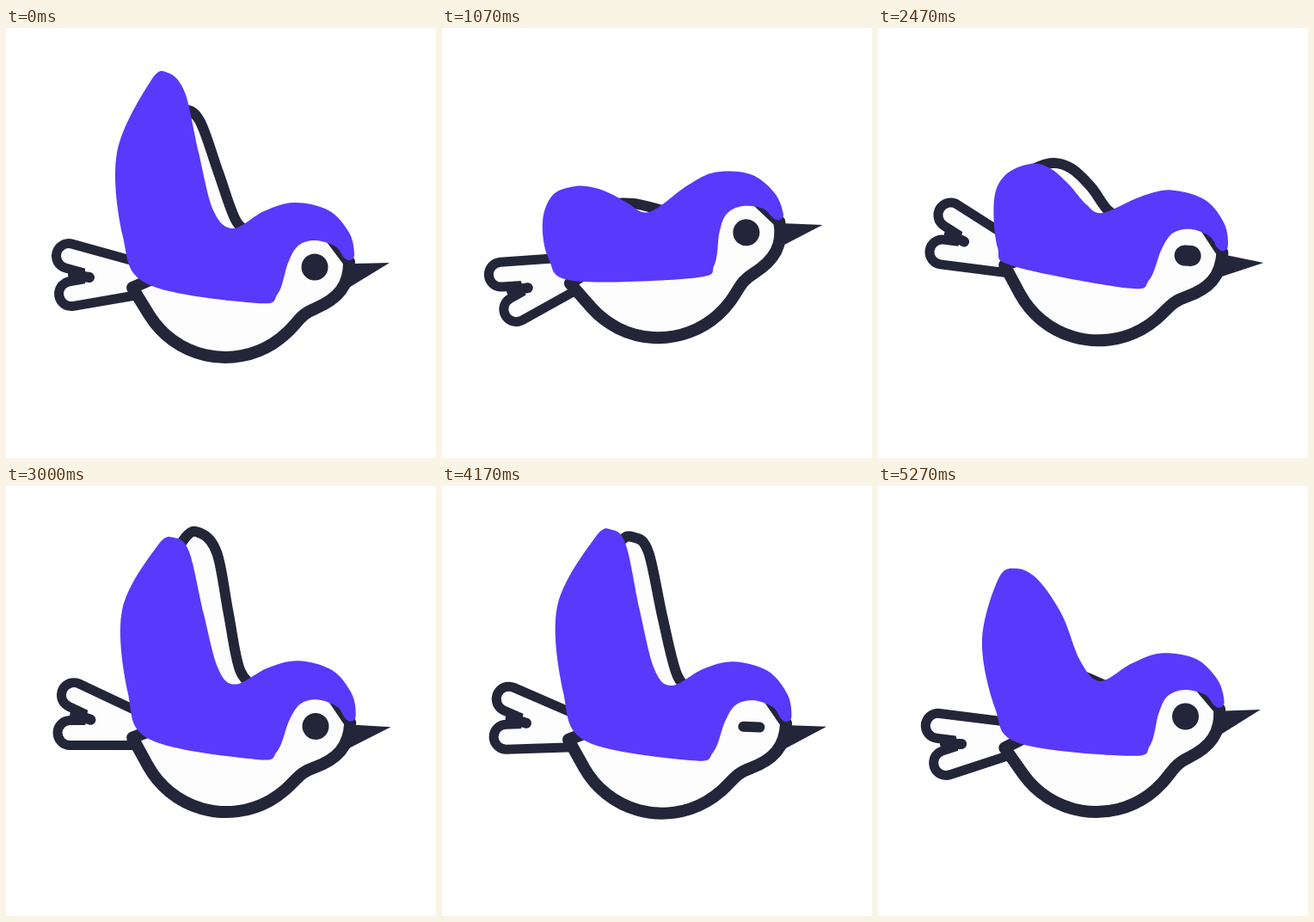
An HTML page with a canvas that plays this animation: 500x500 px, repeating every 5.31 s.

```html
<!DOCTYPE html>
<html lang="en">
<head>
<meta charset="utf-8">
<title>Flying bird</title>
<style>
html, body { margin: 0; width: 100%; height: 100%; overflow: hidden; background: #fff; }
canvas { display: block; width: 500px; height: 500px; }
</style>
</head>
<body>
<canvas id="stage" width="500" height="500"></canvas>
<script>
const ctx = document.getElementById('stage').getContext('2d');
const BLUE = '#5939fb', DARK = '#232639', WHITE = '#fdfdfe';
const LOOP = 5310, FLAP = 590, SET = 3 * FLAP;
const CX = 255, CY = 300;

const wave = (p, peak) => 1 - Math.cos((p - peak) / FLAP * 2 * Math.PI);
const rad = d => d * Math.PI / 180;
const clamp = v => Math.min(1, Math.max(0, v));
const lift = p => -35 * wave(p, 5);
const tilt = p => rad(3.7 - 8.7 * wave(p, 90));

function pairs(a) {
  const out = [];
  for (let i = 0; i < a.length; i += 2) out.push([a[i], a[i + 1]]);
  return out;
}

// Stage coordinates to the bird's own frame at a given phase.
function toLocal([x, y], p) {
  const a = -tilt(p), dx = x - CX, dy = y - CY - lift(p);
  return [CX + dx * Math.cos(a) - dy * Math.sin(a), CY + dx * Math.sin(a) + dy * Math.cos(a)];
}

const pose = (p, ...xy) => ({ p, pts: pairs(xy).map(q => toLocal(q, p)) });

// Wing poses: phase in ms, then the outline from the shoulder round the tip to the root.
const KEYS = [
  pose(0, 264,233, 241,212, 224,145, 208,75, 188,52, 168,62, 129,145, 136,243, 165,298),
  pose(40, 267,232, 247,213, 230,145, 214,69, 198,51, 178,60, 134,140, 141,240, 168,297),
  pose(100, 262,218, 240,207, 220,173, 196,147, 170,140, 147,153, 136,185, 143,250, 160,279),
  pose(110, 261,215, 242,205, 222,182, 200,163, 177,158, 148,171, 135,200, 139,255, 158,277),
  pose(270, 246,170, 216,174, 182,183, 155,205, 146,248, 167,346, 212,438, 240,366, 252,250),
  pose(480, 241,214, 215,203, 197,193, 178,186, 155,184, 129,194, 117,225, 124,268, 153,294),
  pose(550, 258,227, 235,203, 214,150, 186,109, 161,96, 140,108, 121,180, 136,258, 164,299)
];
const CAP = pairs([292,320, 316,309, 328,273, 340,253, 360,247, 383,254, 393,267,
  400,270, 405,263, 399,238, 375,212, 335,203, 300,213]);

function key(i) {
  const n = KEYS.length, turn = Math.floor(i / n), k = KEYS[i - turn * n];
  return { p: k.p + turn * FLAP, pts: k.pts };
}

function wing(phase) {
  const p = ((phase % FLAP) + FLAP) % FLAP;
  let i = KEYS.length - 1;
  while (KEYS[i].p > p) i--;
  const [a, b, c, d] = [key(i - 1), key(i), key(i + 1), key(i + 2)];
  const span = c.p - b.p, u = (p - b.p) / span, u2 = u * u, u3 = u2 * u;
  const mix = (j, k) => {
    const m0 = 0.7 * span * (c.pts[j][k] - a.pts[j][k]) / (c.p - a.p);
    const m1 = 0.7 * span * (d.pts[j][k] - b.pts[j][k]) / (d.p - b.p);
    return (2 * u3 - 3 * u2 + 1) * b.pts[j][k] + (u3 - 2 * u2 + u) * m0 +
      (3 * u2 - 2 * u3) * c.pts[j][k] + (u3 - u2) * m1;
  };
  return b.pts.map((_, j) => [mix(j, 0), mix(j, 1)]);
}

function spline(pts, closed) {
  const n = pts.length;
  const at = i => closed ? pts[(i + n) % n] : pts[Math.min(n - 1, Math.max(0, i))];
  ctx.beginPath();
  ctx.moveTo(...pts[0]);
  for (let i = 0; i < (closed ? n : n - 1); i++) {
    const a = at(i - 1), b = at(i), c = at(i + 1), d = at(i + 2);
    ctx.bezierCurveTo(b[0] + (c[0] - a[0]) / 6, b[1] + (c[1] - a[1]) / 6,
      c[0] - (d[0] - b[0]) / 6, c[1] - (d[1] - b[1]) / 6, c[0], c[1]);
  }
}

function poly(pts) {
  ctx.beginPath();
  pts.forEach(q => ctx.lineTo(...q));
  ctx.closePath();
}

function line(color, width, x1, y1, x2, y2) {
  ctx.strokeStyle = color;
  ctx.lineWidth = width;
  ctx.beginPath();
  ctx.moveTo(x1, y1);
  ctx.lineTo(x2, y2);
  ctx.stroke();
}

function outlined(width) {
  ctx.closePath();
  ctx.fillStyle = WHITE;
  ctx.fill();
  ctx.strokeStyle = DARK;
  ctx.lineWidth = width;
  ctx.stroke();
}

function turned(x, y, angle, paint) {
  ctx.save();
  ctx.translate(x, y);
  ctx.rotate(angle);
  ctx.translate(-x, -y);
  paint();
  ctx.restore();
}

function farWing(s) {
  ctx.save();
  ctx.translate(27, 6);
  spline(wing(62 + s * 0.905), false);
  outlined(12);
  ctx.restore();
}

function tail() {
  for (const [color, w] of [[DARK, 40], [WHITE, 18]]) {
    line(color, w, 73, 265, 152, 287);
    line(color, w, 76, 309, 152, 296);
    ctx.fillStyle = color;
    poly([[92, 270], [155, 285], [155, 297], [92, 306]]);
    ctx.fill();
  }
  line(DARK, 12, 97, 290, 78, 287);
}

function beak() {
  ctx.fillStyle = DARK;
  poly([[393, 275], [404, 274], [446, 273], [397, 303], [388, 309]]);
  ctx.fill();
}

function body() {
  ctx.beginPath();
  ctx.moveTo(147, 302);
  ctx.arc(255, 279, 104, 2.58, 0.8, true);
  ctx.bezierCurveTo(342, 339, 343, 333, 360, 326);
  ctx.bezierCurveTo(386, 315, 399, 300, 399, 272);
  for (const q of [[375, 240], [335, 225], [250, 262], [170, 292]]) ctx.lineTo(...q);
  outlined(14);
}

function eye(s) {
  const shut = clamp(s / 100) - clamp((s - 595) / 146);
  const h = 31 - 25 * shut;
  ctx.fillStyle = DARK;
  ctx.beginPath();
  ctx.roundRect(343.5, 278 - h / 2, 31, h, h / 2);
  ctx.fill();
}

function draw(t) {
  const s = t % SET, p = t % FLAP;
  ctx.fillStyle = '#fff';
  ctx.fillRect(0, 0, 500, 500);
  ctx.lineCap = ctx.lineJoin = 'round';
  ctx.save();
  ctx.translate(0, lift(p));
  turned(CX, CY, tilt(p), () => {
    farWing(s);
    turned(150, 290, rad(16 - 13 * wave(p, 170)), tail);
    turned(400, 286, rad(19 * wave(p, 10)), beak);
    body();
    spline([...wing(p), ...CAP], true);
    ctx.fillStyle = BLUE;
    ctx.fill();
    eye(s);
  });
  ctx.restore();
}

// Steps at 30 frames a second, on a 10 ms clock.
function tick() {
  const t = performance.now() % LOOP;
  const n = Math.min(158, Math.floor((t + 5) * 0.03));
  draw(Math.round(n / 3 * 10) * 10 / 3 * 1 ? Math.round(n * 10 / 3) * 10 : 0);
  requestAnimationFrame(tick);
}
tick();
</script>
</body>
</html>
```
